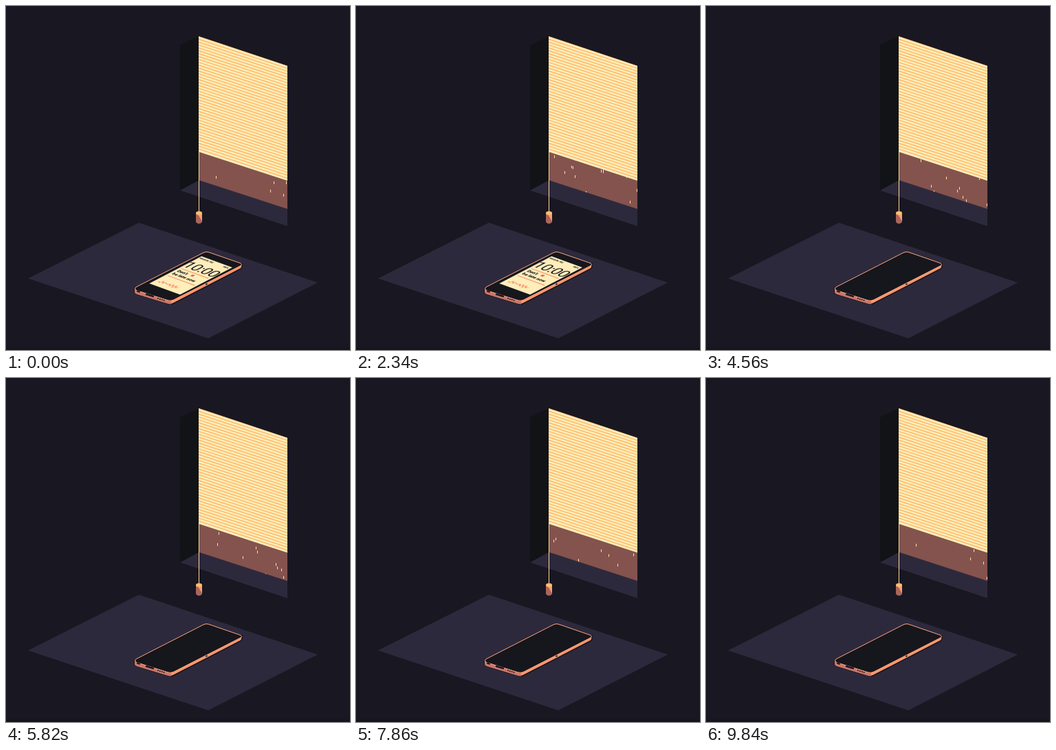
These frames come from a looping animation (500 by 500 pixels, 9900 ms). An HTML page:

```html
<!DOCTYPE html>
<html lang="en">
<head>
<meta charset="utf-8">
<title>Night window</title>
<style>
  html, body { margin: 0; width: 100%; height: 100%; overflow: hidden; background: #191721; }
  svg { display: block; width: 500px; height: 500px; }
  text { font-family: Roboto, sans-serif; fill: #191721; }
  .small { font-size: 8px; font-weight: 700; }
  .note { font-size: 12px; font-weight: 900; }
  .clock { font-size: 37px; font-stretch: 75%; letter-spacing: -1px; text-anchor: middle; }
</style>
</head>
<body>
<svg viewBox="0 0 500 500">
  <defs>
    <clipPath id="pane"><path d="M280 212L409 254V295L280 253Z"/></clipPath>
    <clipPath id="shade"><path d="M280 44L409 87V254L280 212Z"/></clipPath>
  </defs>

  <rect width="500" height="500" fill="#191721"/>
  <rect y="496" width="500" height="4" fill="#16141c"/>
  <path d="M193 315L453 402L294 483L32 396Z" fill="#2d293c"/>

  <!-- window -->
  <path d="M253 57L280 44V254L253 268Z" fill="#111317"/>
  <path d="M253 268L281 253L409 295V320Z" fill="#2d293c"/>
  <g clip-path="url(#pane)">
    <rect x="280" y="212" width="129" height="83" fill="#84534e"/>
    <path id="rain" fill="none" stroke="#ffdfa0" shape-rendering="crispEdges"/>
  </g>
  <g clip-path="url(#shade)">
    <rect x="280" y="44" width="129" height="211" fill="#ffedba"/>
    <path id="slats" fill="none" stroke="#ffb765" stroke-width="1.4"/>
  </g>

  <!-- cord -->
  <path d="M280.5 212V300" stroke="#ffd993"/>
  <path d="M276 301V314Q280.5 319 285 314V301Z" fill="#a9655b"/>
  <path d="M279 303L285 301V313Z" fill="#ff9c72"/>
  <ellipse cx="280.5" cy="301" rx="4.5" ry="2.8" fill="#ffbd6c"/>

  <!-- phone -->
  <path d="M187 409V416Q187 418 190 419L236 433Q240 434.5 244 432L341 382Q343 381 343 378V374L240 425Z" fill="#ff966e" stroke="#15131b" stroke-width="1.5"/>
  <path d="M187 409V416Q187 418 190 419L236 433L240 433.5V425Z" fill="#c9766a"/>
  <path d="M190 408L287 358.5Q291 356.500 295 358L340 373.5Q345 375.5 340 378L244 427Q240 429 236 428L190 413.5Q185 411 190 408Z" fill="#16161d" stroke="#ffa67b"/>
  <g stroke="#191721" stroke-linecap="round" fill="none">
    <path d="M191 414.5L194 415.5" stroke-width="2.2"/>
    <path d="M204 419L214 422" stroke-width="2.4"/>
    <path d="M221 425L232 428.5" stroke-width="2" stroke-dasharray="0 3"/>
    <path d="M291 404.5L292 404" stroke-width="1.8"/>
  </g>

  <g id="screen" transform="matrix(.52 .19 -.52 .27 291 357)">
    <rect x="7" y="20" width="86" height="146" fill="#ffedba"/>
    <text class="small" x="10" y="30">Mobile 4G</text>
    <text class="small" x="90" y="30" text-anchor="end">98%</text>
    <text class="clock" x="49" y="74">10:00</text>
    <g stroke="#f58a66" fill="none" stroke-width="2">
      <path d="M12 82H88M12 120H88"/>
      <path id="scribble"/>
    </g>
    <text class="note" x="14" y="97">Don't</text>
    <text class="note" x="14" y="111">be late now</text>
    <rect x="50" y="88" width="7" height="7" fill="#e8674f"/>
  </g>
</svg>
<script>
  const LOOP = 9900, STEP = 60, SCREEN_OFF = 4260;
  const SPEED = 0.1, FALL = 460, DROPS = 180, SLATS = 40, DROP_LENGTH = 4;
  const byId = id => document.getElementById(id);
  const mod = (n, m) => ((n % m) + m) % m;
  const shadeEdge = x => 212 + (x - 280) * 42 / 129;

  let seed = 7;
  const rand = () => (seed = (seed * 16807) % 2147483647) / 2147483647;

  const drops = Array.from({ length: DROPS }, () => ({
    x: 281 + Math.floor(rand() * 128),
    born: rand() * LOOP
  }));

  const pitch = 168 / SLATS;
  let slats = '';
  for (let i = 0; i < SLATS; i++) slats += `M280 ${44 + i * pitch}l129 42.5`;
  byId('slats').setAttribute('d', slats);

  let scribble = 'M16 148';
  for (let x = 20; x <= 68; x += 4) scribble += `L${x} ${147 + 5 * Math.sin(x * 0.7)}`;
  byId('scribble').setAttribute('d', scribble);

  function rainPath(t) {
    let d = '';
    for (const { x, born } of drops) {
      const age = mod(t - born, LOOP);
      if (age > FALL) continue;
      const y = Math.round(shadeEdge(x) + age * SPEED);
      d += `M${x + 0.5} ${y - DROP_LENGTH}v${DROP_LENGTH}`;
    }
    return d;
  }

  const rain = byId('rain'), screen = byId('screen');
  const start = performance.now();

  function draw(now) {
    const t = Math.floor(mod(now - start, LOOP) / STEP) * STEP;
    rain.setAttribute('d', rainPath(t));
    screen.style.visibility = t < SCREEN_OFF ? 'visible' : 'hidden';
    requestAnimationFrame(draw);
  }
  draw(start);
</script>
</body>
</html>
```
